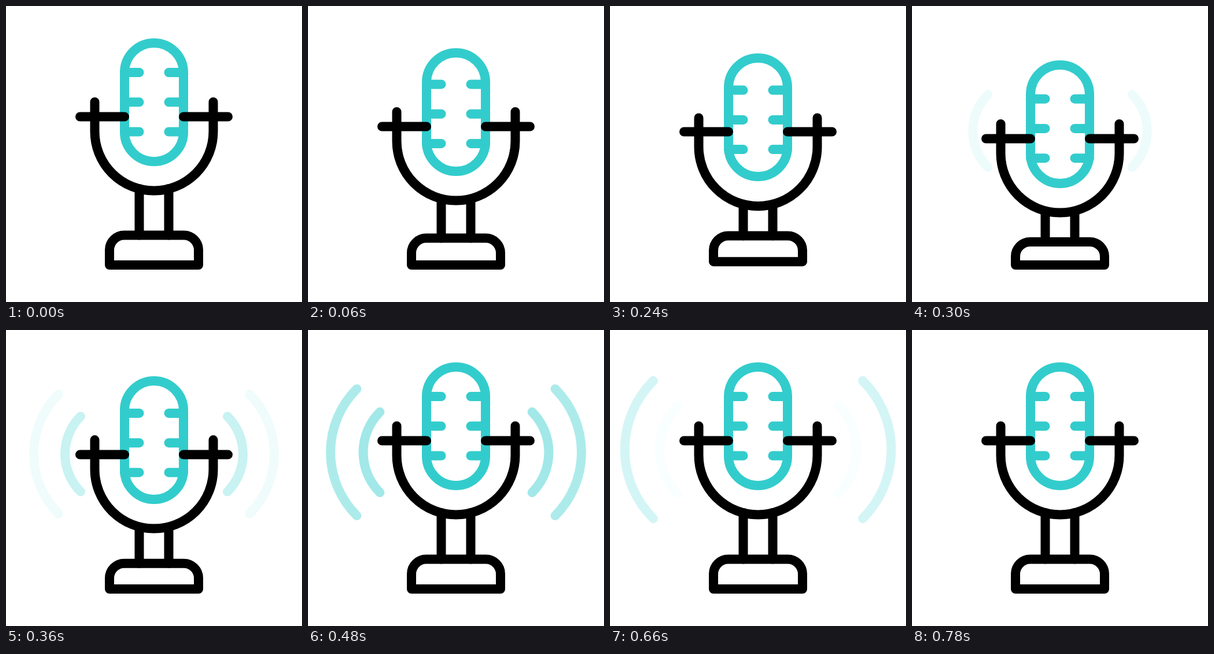
Write an HTML page that moves like this. It is 512 px wide and 512 px high and loops after 900 ms.

```html
<!DOCTYPE html>
<html lang="en">
<head>
<meta charset="utf-8">
<title>Microphone</title>
<style>
html, body { margin: 0; width: 100%; height: 100%; overflow: hidden; background: #fff; }
svg { display: block; width: 100vw; height: 100vh; }
</style>
</head>
<body>
<svg viewBox="0 0 512 512" fill="none" stroke-width="16" stroke-linecap="round" stroke-linejoin="round">
  <g stroke="#33cccc">
    <path id="inner"/>
    <path id="outer"/>
    <rect id="capsule" x="205" y="64" width="102" height="205" rx="51"/>
    <path id="marks" d="M205 115h25.5M205 166.3h25.5M205 217.5h25.5M307 115h-25.5M307 166.3h-25.5M307 217.5h-25.5"/>
  </g>
  <g stroke="#000">
    <path id="stem"/>
    <path id="base"/>
    <path id="cup"/>
    <path id="arms" d="M128 191.5h77M307 191.5h77"/>
  </g>
</svg>
<script>
const STEP = 60, LOOP = 900, LAST = 780;
const el = id => document.getElementById(id);
const shift = (id, y) => el(id).setAttribute('transform', `translate(0 ${y})`);
const draw = (id, d) => el(id).setAttribute('d', d);

// Head height over time: rest, crouch, apex, landing, rest
const KEYS = [[0, 0], [100, 26], [180, -29], [266, 40.5], [480, 0]];

function headAt(t) {
  const i = KEYS.findIndex(([time]) => time > t);
  if (i < 0) return 0;
  const [t0, y0] = KEYS[i - 1], [t1, y1] = KEYS[i];
  const p = (t - t0) / (t1 - t0);
  return y0 + (y1 - y0) * (1 - Math.cos(Math.PI * p)) / 2;
}

// Ballistic hop of the base
const liftAt = t => Math.min(0, 22 * (((t - 180) / 70) ** 2 - 1));

// Smooth rise and fall around a peak
function hump(t, peak, width) {
  const x = Math.min(1, Math.abs(t - peak) / width);
  return 0.46 * Math.cos(x * Math.PI / 2) ** 2;
}

// A mirrored pair of quarter-circle arcs
function wave(id, r, cy, alpha) {
  const h = r * Math.SQRT1_2, cx = 194;
  const arc = (x, sweep) => `M${x} ${cy - h}A${r} ${r} 0 0 ${sweep} ${x} ${cy + h}`;
  draw(id, arc(cx - h, 0) + arc(512 - cx + h, 1));
  el(id).setAttribute('stroke-opacity', alpha);
}

function pose(t) {
  const head = headAt(t), lift = liftAt(t);
  shift('capsule', head);
  shift('arms', head);
  shift('marks', 1.2 * head + 0.1 * lift);

  const tip = 166 + head - 0.25 * lift;
  const bowl = 217 + head - 0.13 * lift;
  draw('cup', `M153.5 ${tip}V${bowl}a102.5 102.5 0 0 0 205 0V${tip}`);

  const stem = 316 + 1.05 * head;
  const top = 396.5 + 1.17 * lift + 0.3 * head;
  const bottom = 448 + lift;
  draw('stem', `M230.5 ${stem}V${top}M281.5 ${stem}V${top}`);
  draw('base', `M179 ${bottom}V${top + 25.5}a25.5 25.5 0 0 1 25.5-25.5h103a25.5 25.5 0 0 1 25.5 25.5V${bottom}Z`);

  const k = (t - 360) / STEP, cy = 214.5 - 1.5 * k;
  wave('inner', 92 + 3.25 * k, cy, hump(t, 465, 230));
  wave('outer', 146 + 4.5 * k, cy, hump(t, 535, 235));
}

const start = performance.now();
function tick() {
  const t = (performance.now() - start) % LOOP;
  pose(Math.min(LAST, Math.floor(t / STEP) * STEP));
  requestAnimationFrame(tick);
}
tick();
</script>
</body>
</html>
```
